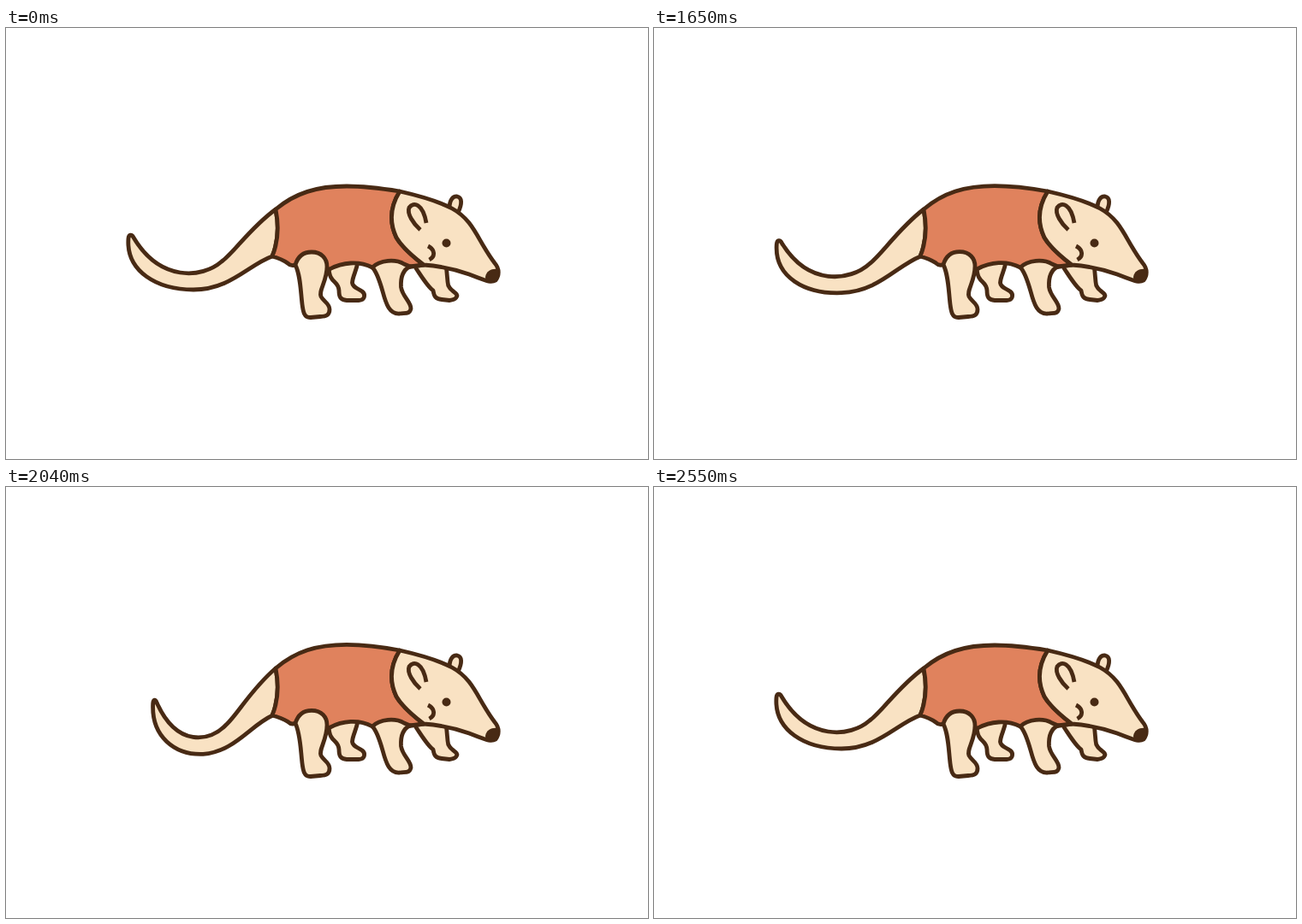
Write an HTML page that moves like this. It is 750 px wide and 504 px high and loops after 2700 ms.

```html
<!DOCTYPE html>
<html lang="en">
<head>
<meta charset="utf-8">
<title>Tamandua</title>
<style>
  html, body { margin: 0; width: 100%; height: 100%; overflow: hidden; background: #fff; }
  svg { display: block; width: 750px; height: 504px; }
  path { fill: #f9e2c3; stroke: #482a14; stroke-width: 4.8; stroke-linejoin: round; stroke-linecap: round; }
  .line { fill: none; stroke-linecap: butt; }
  .ink { fill: #482a14; stroke: none; }
  #torso { fill: #e0825d; }
</style>
</head>
<body>
<svg viewBox="0 0 750 504">
  <!-- far legs -->
  <path d="M377 280C378 300 388 294 389 307C389 315 391 318 398 318.500L412 318.500C420 318 420 311 416 308C410 304 405 303 404.500 298C405 290 409 285 411 274"/>
  <path d="M479 281C487 293 493 303 499 307C500 314 502 317 509 317.500L518 318.500C526 318 529 313 525 310C520 306 516 303 516 297L514 275"/>
  <path id="tail"/>
  <path id="torso"/>
  <!-- head -->
  <path id="farEar" d="M518 211C518 201 522 196.500 527 197C533 198 533 206 528 216"/>
  <path d="M460 191C482 196 506 203 521 211C547 225 551 249 571 275C577 282 576 290 572 295C566 299 558 294 541 288C521 281 502 278 488 277C475 267 463 257 456 245C447 226 450 207 460 191Z"/>
  <path class="ink" d="M560 291C561 284 568 281 574 282C578 287 576 297 567 298C562 298 560 295 560 291Z"/>
  <path id="nearEar" class="line" d="M484 236C476 229 468 217 471 210C476 203 487 205 491 228"/>
  <ellipse id="eye" class="ink" cx="514.500" cy="251.500" rx="5"/>
  <path class="line" d="M493 255C501 259 502 267 494.500 271"/>
  <!-- near legs -->
  <path id="hindLeg"/>
  <path d="M428 280C437 271 455 270 465 276L472 279C463 283 461 294 461.500 303C463 314 473 320 473 328C472 335 466 333 460 334C448 335 444 323 440 308C436 294 433 285 428 280Z"/>
  <path class="line" d="M472 279C478 279 483 278 488 277"/>
</svg>
<script>
const LOOP = 2700, STEP = 30;
const get = id => document.getElementById(id);
const setPath = (id, d) => get(id).setAttribute('d', d);

// Share of a span that has passed, 0 to 1.
const progress = (t, from, to) => Math.min(1, Math.max(0, (t - from) / (to - from)));
const bump = u => Math.sin(Math.PI * u) ** 2;

const TAIL = 'M315 212C285 234 267 262 252 273C229 293 180 297 149 245C147 241 143.5 241 143 246' +
  'C140 285 177 306 219 306C262 306 283 277 311 267C318 250 319 232 315 212Z';

// The tip circles down, inward and up; the rest follows less towards the body.
function tailSwing(t) {
  const u = progress(t, 1590, 2550), v = u ** 1.1;
  return {
    x: 32 * bump(u ** 1.25),
    y: 20.5 * Math.sin(2 * Math.PI * v) + 4 * Math.sin(Math.PI * v)
  };
}

function bend(path, swing) {
  return path.replace(/([\d.]+) ([\d.]+)/g, (_, px, py) => {
    const s = Math.max(0, (315 - px) / 170);
    const x = +px + swing.x * s ** 1.6;
    const y = +py + swing.y * s - 0.18 * swing.x * s ** 4;
    return `${x.toFixed(2)} ${y.toFixed(2)}`;
  });
}

function draw(t) {
  const swing = tailSwing(t);
  const y = v => v - swing.y / 17; // the body gives way slightly
  setPath('tail', bend(TAIL, swing));
  setPath('torso',
    `M315 212C338 ${y(193)} 363 ${y(185)} 398 ${y(185)}C420 ${y(185)} 441 ${y(188)} 460 191` +
    'C450 207 447 226 456 245C463 257 475 267 488 277L472 279L428 280' +
    `C412 ${y(272)} 393 ${y(274)} 378 ${y(282)}L345 ${y(285)}L338 ${y(277)}` +
    `Q333 ${y(279)} 329 ${y(275)}Q322 270 311 267C318 250 319 232 315 212Z`);
  setPath('hindLeg',
    `M338 ${y(277)}C341 ${y(267)} 348 ${y(262)} 357 ${y(262)}C369 ${y(262)} 375 ${y(270)} 375 ${y(279)}` +
    'C375 296 365 307 368 314C371 320 378 322 378 329C378 336 374 337 367 337.5L356 338.5' +
    `C348 339 347 331 346 323C344 306 344 289 338 ${y(277)}Z`);

  const twitch = -10 * bump(progress(t, 870, 1290));
  get('nearEar').setAttribute('transform', `rotate(${twitch} 487 232)`);
  get('farEar').setAttribute('transform', `rotate(${twitch} 523 213)`);
  get('eye').setAttribute('ry', 5 - 4.5 * bump(progress(t, 840, 960)));
}

function tick() {
  const t = performance.now() % LOOP;
  draw(Math.floor(t / STEP) * STEP);
  requestAnimationFrame(tick);
}
tick();
</script>
</body>
</html>
```
